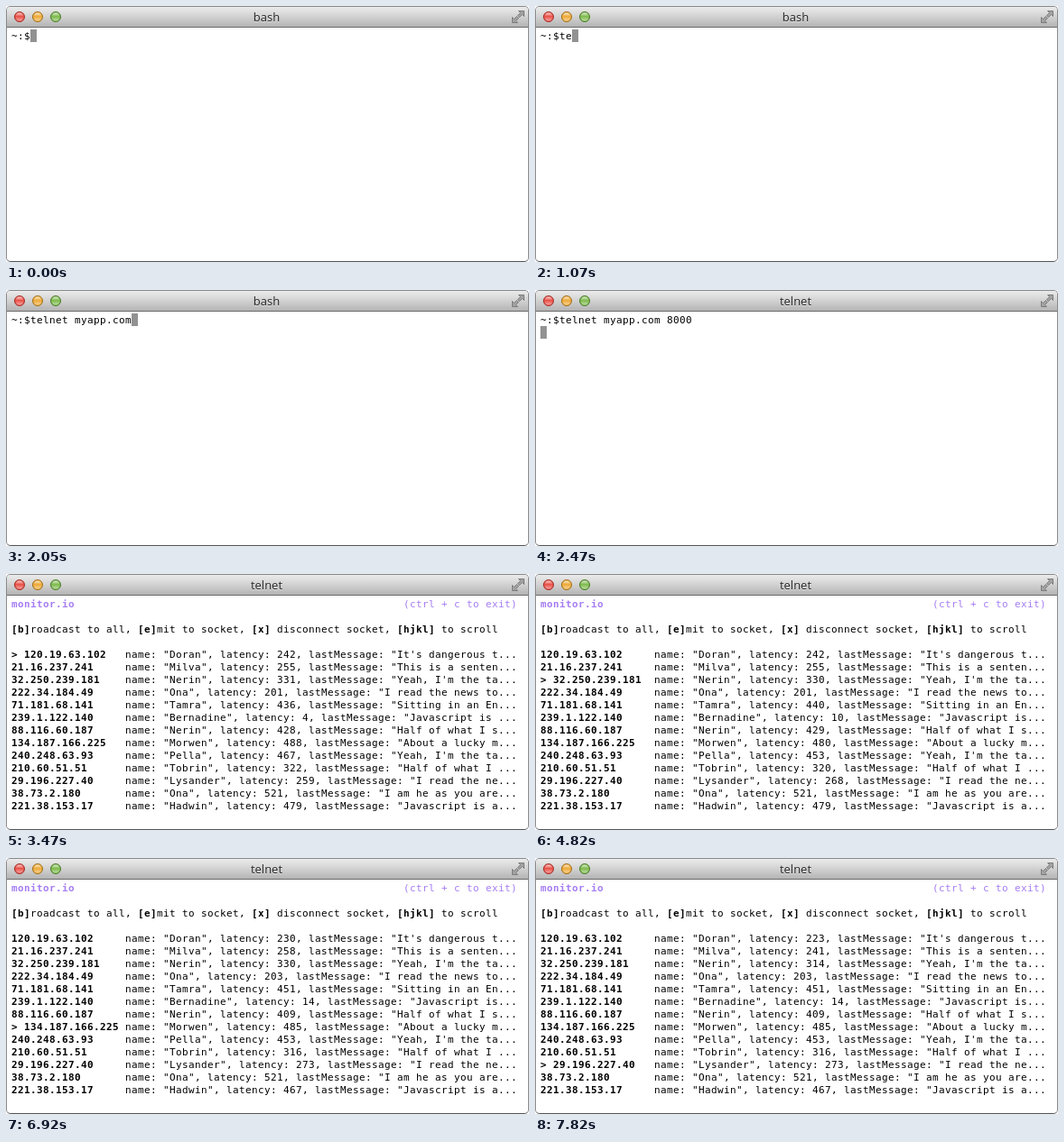
These frames come from a looping animation (579 by 284 pixels, 8 s). An HTML page:

```html
<!DOCTYPE html>
<html lang="en">
<head>
<meta charset="utf-8">
<title>Terminal</title>
<style>
html, body { margin: 0; width: 100%; height: 100%; overflow: hidden; background: #fff; }
#win {
  position: absolute; left: 0; top: 0; width: 579px; height: 284px; box-sizing: border-box;
  border: 1px solid #8a8a8a; border-bottom-color: #555; border-radius: 5px; overflow: hidden;
}
#bar {
  position: absolute; left: 0; top: 0; width: 577px; height: 22px;
  background: linear-gradient(#ebebeb, #d4d4d4 45%, #b4b4b4); border-bottom: 1px solid #6a6a6a;
}
#title {
  position: absolute; left: 0; top: 3px; width: 577px; text-align: center; color: #262626;
  font: 500 13px/18px "Open Sans", "Noto Sans", sans-serif; text-shadow: 0 1px #ffffff80;
}
svg { position: absolute; left: 0; top: 0; }
/* the spacing sets the glyphs on a 7px grid */
pre {
  position: absolute; left: 6px; top: 27px; margin: 0; color: #000;
  font: 11px/14px "DejaVu Sans Mono", monospace; letter-spacing: calc(7px - 1ch);
  font-variant-ligatures: none;
}
pre i { font-style: normal; color: #a57df2; }
#cursor { position: absolute; width: 7px; height: 14px; background: #929292; }
</style>
</head>
<body>
<div id="win"><div id="bar"></div></div>
<div id="title"></div>
<svg width="579" height="24">
  <defs>
    <linearGradient id="gloss" x2="0" y2="1">
      <stop offset="0" stop-color="#fff" stop-opacity=".75"/>
      <stop offset=".45" stop-color="#fff" stop-opacity=".05"/>
      <stop offset="1" stop-color="#fff" stop-opacity=".5"/>
    </linearGradient>
  </defs>
  <g id="lights"></g>
  <g fill="#a2a2a2" stroke="#777" stroke-width=".9">
    <path d="M567.5 5.5h6v6l-2-2-3 3-2-2 3-3z"/>
    <path d="M560.5 12.5v6h6l-2-2 3-3-2-2-3 3z"/>
  </g>
</svg>
<div id="cursor"></div>
<pre id="screen"></pre>
<script>
const $ = id => document.getElementById(id);
const LOOP = 8000, TYPE = 1000, ENTER = 2470, CONNECT = 3470, KEY = 70;
const command = 'telnet myapp.com 8000';
const moves = [4520, 4820, 5120, 6020, 6320, 6620, 6920, 7220, 7520, 7820];

// address, name, message, first latency, then pairs of time and new latency
const sockets = [
  ['120.19.63.102', 'Doran', "It's dangerous to", 242, 5720, 230, 7820, 223],
  ['21.16.237.241', 'Milva', 'This is a sentence', 255, 5120, 258, 7820, 241],
  ['32.250.239.181', 'Nerin', "Yeah, I'm the tax", 331, 4220, 330, 7820, 314],
  ['222.34.184.49', 'Ona', 'I read the news today', 201, 5120, 203],
  ['71.181.68.141', 'Tamra', 'Sitting in an English', 436, 4220, 440, 5420, 451],
  ['239.1.122.140', 'Bernadine', 'Javascript is a', 4, 4220, 10, 5420, 14],
  ['88.116.60.187', 'Nerin', 'Half of what I say', 428, 4220, 429, 5420, 409],
  ['134.187.166.225', 'Morwen', 'About a lucky man', 488, 4220, 480, 5420, 485],
  ['240.248.63.93', 'Pella', "Yeah, I'm the tax", 467, 4220, 453],
  ['210.60.51.51', 'Tobrin', 'Half of what I say', 322, 4220, 320, 5420, 316],
  ['29.196.227.40', 'Lysander', 'I read the news', 259, 4220, 268, 5420, 273],
  ['38.73.2.180', 'Ona', 'I am he as you are he', 521],
  ['221.38.153.17', 'Hadwin', 'Javascript is a', 479, 5720, 467],
];

const header = '<i><b>' + 'monitor.io'.padEnd(62) + '</b>(ctrl + c to exit)</i>';
const help = '[b]roadcast to all, [e]mit to socket, [x] disconnect socket, [hjkl] to scroll'
  .replace(/\[\w+\]/g, '<b>$&</b>');

function socketLine([ip, name, message, latency, ...changes], selected, t) {
  for (let i = 0; i < changes.length; i += 2) if (t >= changes[i]) latency = changes[i + 1];
  const label = ((selected ? '> ' : '') + ip).padEnd(18).replace('>', '&gt;');
  const info = `name: "${name}", latency: ${latency}, lastMessage: "${message}"`;
  return `<b>${label}</b>${info.slice(0, 59)}...`;
}

function monitor(t) {
  const selected = moves.filter(m => t >= m).length;
  const lines = sockets.map((s, i) => socketLine(s, i === selected, t));
  return [header, '', help, '', ...lines].join('\n');
}

let shown;
function frame(now) {
  const t = now % LOOP;
  const typed = Math.max(0, Math.min(command.length, Math.floor((t - TYPE) / KEY) + 1));
  const entered = t >= ENTER;
  const html = t < CONNECT ? '~:$' + command.slice(0, typed) : monitor(t);
  if (html !== shown) $('screen').innerHTML = shown = html;
  $('title').textContent = entered ? 'telnet' : 'bash';
  const cursor = $('cursor').style;
  cursor.display = t < CONNECT ? 'block' : 'none';
  cursor.left = 6 + (entered ? 0 : 7 * (3 + typed)) + 'px';
  cursor.top = (entered ? 40 : 26) + 'px';
  requestAnimationFrame(frame);
}

$('lights').innerHTML = [['#e8483f', '#a3342e'], ['#eda62e', '#a0701f'], ['#78b744', '#4f7d31']]
  .map(([fill, edge], i) => `<circle cx="${15 + 20 * i}" cy="12" r="5.5" fill="${fill}" stroke="${edge}"/>
    <circle cx="${15 + 20 * i}" cy="12" r="4.5" fill="url(#gloss)"/>`).join('');
frame(performance.now());
</script>
</body>
</html>
```
